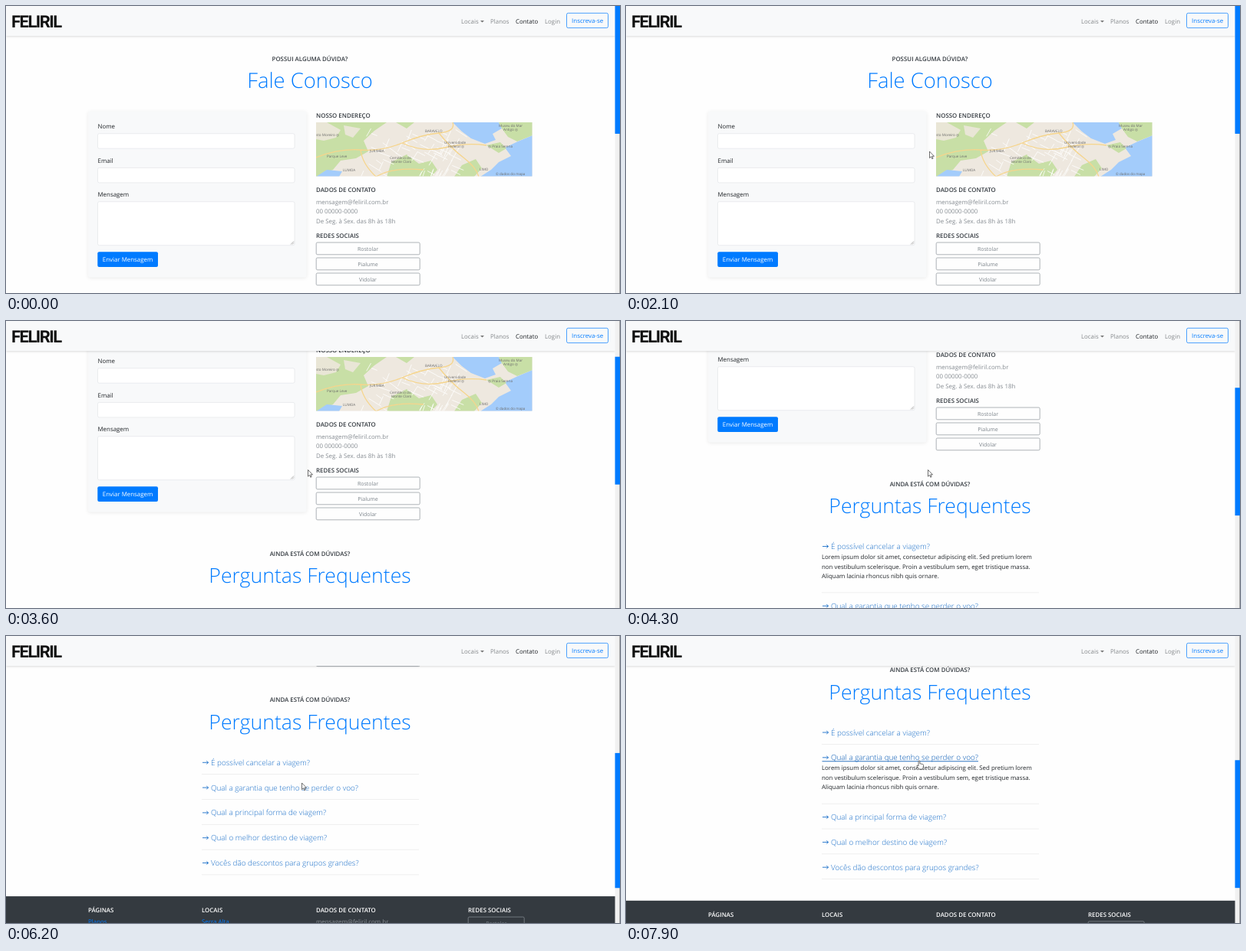
Recreate the animation shown at these times as an HTML page. Size 800 by 375 pixels, loop 8000 ms.

```html
<!DOCTYPE html>
<html lang="pt-BR">
<head>
<meta charset="utf-8">
<title>Fale Conosco</title>
<style>
  html, body { margin: 0; width: 100%; height: 100%; overflow: hidden; background: #fff; }
  svg { display: block; }
  text { font: 7.9px "Open Sans", "Noto Sans", sans-serif; text-rendering: geometricPrecision; fill: #212529; }
  .mid { text-anchor: middle; }
  .head { font-weight: 600; fill: #343a40; }
  .title { font-weight: 300; fill: #007bff; }
  .muted { fill: #868c92; }
  .nav { fill: #85888b; }
  .small { font-size: 7px; fill: #7b838a; }
  .blue { fill: #007bff; }
  .light { fill: #fff; }
  .question { font-size: 9.9px; font-weight: 300; fill: #1a6fc9; }
  .brand { font: 700 22px Roboto, sans-serif; letter-spacing: -1.5px; fill: #111; }
  .place { font-size: 4.6px; fill: #6b6b6b; }
  .field { fill: #fff; stroke: #dde1e5; stroke-width: .6; }
  .outline { fill: none; stroke: #8b9299; stroke-width: .7; }
  .card { fill: #f8f9fa; filter: drop-shadow(0 1px 2px rgba(0,0,0,.08)); }
  .rule { fill: #ececec; }
</style>
</head>
<body>
<svg id="stage" width="100%" height="100%" viewBox="0 0 800 375">
  <rect width="800" height="375" fill="#fefefe"/>
  <g id="page"></g>
  <g id="bar"></g>
  <g id="cursor">
    <path id="arrow" d="M0 0V8.6L2 6.8 3.3 9.7 4.6 9.1 3.3 6.3H6Z" fill="#fff" stroke="#333" stroke-width=".7"/>
    <path id="hand" d="M-.9 1Q0-.6.9 1V4.2L4.8 5.1Q5.8 5.4 5.6 7L4.8 11.5H-.2L-3 7.6Q-3.3 6.2-1.8 6.6L-.9 7.4Z" fill="#fff" stroke="#333" stroke-width=".7"/>
  </g>
</svg>
<script>
const $ = id => document.getElementById(id);
const LOOP = 8000, STEP = 100, VIEW = 375;
const PITCH = 32.8, ANSWER = 45, FIRST = 490.5, FOOTER = 665.3, HEIGHT = 797.5;

const text = (x, y, s, cls = '', extra = '') =>
  `<text x="${x}" y="${y + 2.8}" class="${cls}" ${extra}>${s}</text>`;
const rect = (x, y, w, h, attrs = '') =>
  `<rect x="${x}" y="${y}" width="${w}" height="${h}" ${attrs}/>`;
const path = (d, attrs) => `<path d="${d}" ${attrs}/>`;

const social = ['Rostolar', 'Pialume', 'Vidolar'];
const email = 'mensagem@feliril.com.br';

function streets() {
  let seed = 7, d = '';
  const rnd = () => (seed = seed * 16807 % 2147483647) / 2147483647;
  for (let i = 0; i < 60; i++) {
    const x = 62 + rnd() * 125, y = 8 + rnd() * 60, a = (i % 2 ? .35 : 1.9) + rnd() * .3, r = 8 + rnd() * 16;
    d += `M${x.toFixed(1)} ${y.toFixed(1)}l${(Math.cos(a) * r).toFixed(1)} ${(Math.sin(a) * r).toFixed(1)}`;
  }
  return path(d, 'fill="none" stroke="#fff" stroke-width=".8"');
}

function map() {
  const green = 'fill="#c8dfa6"', water = 'fill="#a3ccfb"', road = 'fill="none" stroke="#f6d58c" stroke-width="1.3"';
  const places = [
    [0, 16, 'sto Moreiro ◎'], [14, 44, 'Parque Leve'], [35, 62, 'LUMOA'], [70, 37, 'JURIMBA'],
    [142, 11, 'BARAVELO'], [96, 46, 'Cemitério do'], [98, 51, 'Monte Claro'], [167, 26, 'Universidade'],
    [172, 31, 'Federal ◎'], [224, 31, '◎ Praia Serena'], [238, 4, 'Museu do Mar'],
    [244, 9, 'Antigo ◎'], [213, 61, 'LIMO'], [234, 67, '© dados do mapa']
  ];
  return `<svg x="404" y="152" width="281.5" height="70.5">` +
    rect(0, 0, 282, 71, 'fill="#eee8df"') +
    path('M0 0H92L76 11 62 24 68 38 52 47 32 50 22 62 0 71Z', green) +
    path('M0 0H14L32 10 26 20 10 24 0 22ZM36 4 58 8 48 20 38 16Z', 'fill="#e9e6d6"') +
    path('M98 52 118 42 134 54 150 50 158 62 150 71H92ZM104 0H128L118 8ZM190 56 208 48 216 60 206 71H180Z', green) +
    path('M0 71 14 62 34 64 30 71Z', water) +
    path('M178 0H238L242 8 230 15 234 23 220 28 202 21 190 12Z', water) +
    path('M282 17 263 25 246 33 254 44 238 52 228 62 214 71H282Z', water) +
    path('M238 0H282V17L262 25 250 19 242 8ZM222 30 240 26 248 34 238 40Z', green) +
    streets() +
    path('M0 46Q30 34 58 36T112 27 160 14 178 0M58 36Q60 54 78 71M112 27Q140 40 168 33T222 30M160 14Q176 34 192 46T212 71M78 71Q100 58 140 62', road) +
    places.map(([x, y, s]) => text(x, y - 1, s, 'place')).join('') + '</svg>';
}

const contact = () =>
  text(396, 69, 'POSSUI ALGUMA DÚVIDA?', 'head mid') +
  text(396, 104.2, 'Fale Conosco', 'title mid', 'style="font-size:27.4px"') +
  rect(107, 137.5, 284.5, 217, 'rx="3" class="card"') +
  [['Nome', 157, 19.5], ['Email', 201.7, 19.5], ['Mensagem', 246, 57]].map(([s, y, h]) =>
    text(119.5, y, s) + rect(119.5, y + 9.7, 256.5, h, 'rx="2" class="field"')).join('') +
  path('M371 311.5l4-4m-2 4l2-2', 'stroke="#777" stroke-width=".6"') +
  rect(119.3, 321.3, 78.7, 19.7, 'rx="2" class="blue"') +
  text(158.6, 331, 'Enviar Mensagem', 'light mid') +
  text(404, 143, 'NOSSO ENDEREÇO', 'head') + map() +
  text(404, 240, 'DADOS DE CONTATO', 'head') +
  text(404, 255.7, email, 'muted') +
  text(404, 268, '00 00000-0000', 'muted') +
  text(404, 280.7, 'De Seg. à Sex. das 8h às 18h', 'muted') +
  text(404, 300, 'REDES SOCIAIS', 'head') +
  social.map((s, i) => rect(404.2, 309 + i * 20, 135, 15.8, 'rx="1.6" class="outline"') +
    text(471.5, 316.8 + i * 20, s, 'small mid')).join('');

const questions = [
  'É possível cancelar a viagem?', 'Qual a garantia que tenho se perder o voo?',
  'Qual a principal forma de viagem?', 'Qual o melhor destino de viagem?',
  'Vocês dão descontos para grupos grandes?'
];
const lorem = [
  'Lorem ipsum dolor sit amet, consectetur adipiscing elit. Sed pretium lorem',
  'non vestibulum scelerisque. Proin a vestibulum sem, eget tristique massa.',
  'Aliquam lacinia rhoncus nibh quis ornare.'
];

const item = (q, i) => `<g id="item${i}">` +
  path('M256 0H263.5M261.3-2L263.7 0 261.3 2', 'fill="none" stroke="#1a6fc9" stroke-width=".9"') +
  text(267, .7, q, 'question', `id="q${i}"`) +
  (i === 1 ? rect(255.5, 4.6, 203.5, .8, 'id="underline" fill="#0056b3"') : '') +
  (i < 2 ? `<svg id="answer${i}" x="255" y="7" width="290" height="0">` +
    lorem.map((s, n) => text(0, 6.7 + n * 12.6, s)).join('') + '</svg>' : '') +
  rect(255, 15, 283, .8, `id="rule${i}" class="rule"`) + '</g>';

const faq = () =>
  text(396, 408.9, 'AINDA ESTÁ COM DÚVIDAS?', 'head mid') +
  text(396, 444.2, 'Perguntas Frequentes', 'title mid', 'style="font-size:26.6px"') +
  questions.map(item).join('');

const footer = () => '<g id="footer">' + rect(0, 0, 800, 140, 'fill="#343a40"') +
  [[107, 'PÁGINAS'], [255, 'LOCAIS'], [404, 'DADOS DE CONTATO'], [602, 'REDES SOCIAIS']]
    .map(([x, s]) => text(x, 18, s, 'head', 'style="fill:#fff"')).join('') +
  text(107, 33, 'Planos', 'blue') + text(255, 33, 'Serra Alta', 'blue') +
  text(404, 33, email, 'muted') +
  rect(602.2, 27, 73, 15.8, 'rx="1.6" class="outline"') + text(638.7, 35, social[0], 'small mid') + '</g>';

$('page').innerHTML = contact() + faq() + footer();
$('bar').innerHTML =
  rect(0, 0, 794, 39, 'fill="#f8f9fa" style="filter:drop-shadow(0 1px 1.5px rgba(0,0,0,.14))"') +
  text(7, 25, 'FELIRIL', 'brand') +
  text(593, 20, 'Locais', 'nav') + path('M618 19h5l-2.5 2.6Z', 'fill="#777"') +
  text(631, 20, 'Planos', 'nav') + text(664, 20, 'Contato') + text(702, 20, 'Login', 'nav') +
  rect(730.5, 9.3, 54, 19.3, 'rx="2" fill="none" stroke="#007bff" stroke-width=".7"') +
  text(757.6, 19, 'Inscreva-se', 'blue mid') +
  rect(793.5, 0, 6.5, VIEW, 'fill="#f1f1f1"') + rect(799.2, 0, .8, VIEW, 'fill="#999"') +
  rect(793.5, 0, 6.5, 0, 'id="thumb" class="blue"');

// Tracks: [time, ...values], linear between keys
const scrollKeys = [[3200, 0], [3300, 11], [3400, 40], [3500, 74], [3600, 105], [3800, 147], [3900, 156],
  [4100, 156], [4200, 167], [4300, 196], [4500, 260], [4700, 303], [4800, 312.3],
  [6000, 312.3], [6100, 315], [6200, 325.2], [6300, 349], [6400, 364.5]];
const openKeys = [
  [[5600, 1], [5700, .92], [5800, .5], [5900, .12], [6000, 0]],
  [[7400, 0], [7500, .06], [7600, .4], [7700, .8], [7800, .97], [7900, 1]]
];
const cursorKeys = [[700, 612, 62], [900, 541, 118], [1200, 478, 152], [1500, 425, 176], [1600, 416, 180],
  [2100, 395.5, 190], [2400, 393.5, 194.5], [5100, 393.5, 194.5], [5200, 390, 180],
  [5700, 390, 180], [6200, 385.5, 192], [6500, 385.5, 192], [7000, 382, 162.5]];

function track(keys, t) {
  if (t <= keys[0][0]) return keys[0].slice(1);
  const i = keys.findIndex(k => k[0] > t);
  if (i < 0) return keys[keys.length - 1].slice(1);
  const a = keys[i - 1], b = keys[i], p = (t - a[0]) / (b[0] - a[0]);
  return a.slice(1).map((v, n) => v + (b[n + 1] - v) * p);
}
const move = (id, x, y) => $(id).setAttribute('transform', `translate(${x} ${y})`);
const set = (id, name, v) => $(id).setAttribute(name, v);
const show = (id, on) => set(id, 'visibility', on ? 'visible' : 'hidden');

function draw(t) {
  const [scroll] = track(scrollKeys, t);
  const grow = openKeys.map(k => track(k, t)[0] * ANSWER);
  const total = grow[0] + grow[1], height = HEIGHT + total;
  move('page', 0, -scroll);
  let shift = 0;
  questions.forEach((_, i) => {
    const g = grow[i] || 0;
    move('item' + i, 0, FIRST + i * PITCH + shift);
    set('rule' + i, 'y', 15 + g);
    if (i < 2) set('answer' + i, 'height', g);
    shift += g;
  });
  move('footer', 0, FOOTER + total);
  set('thumb', 'y', scroll * VIEW / height);
  set('thumb', 'height', VIEW * VIEW / height);

  const hover = t >= 6900, hand = hover || (t >= 5200 && t < 5900);
  show('underline', hover);
  $('q1').style.fill = hover ? '#0056b3' : '';
  $('cursor').style.display = t < 700 ? 'none' : '';
  show('arrow', !hand);
  show('hand', hand);
  move('cursor', ...track(cursorKeys, t));
}

const start = performance.now();
function frame() {
  const t = (performance.now() - start) % LOOP;
  draw(Math.floor(t / STEP) * STEP);
  requestAnimationFrame(frame);
}
frame();
</script>
</body>
</html>
```
